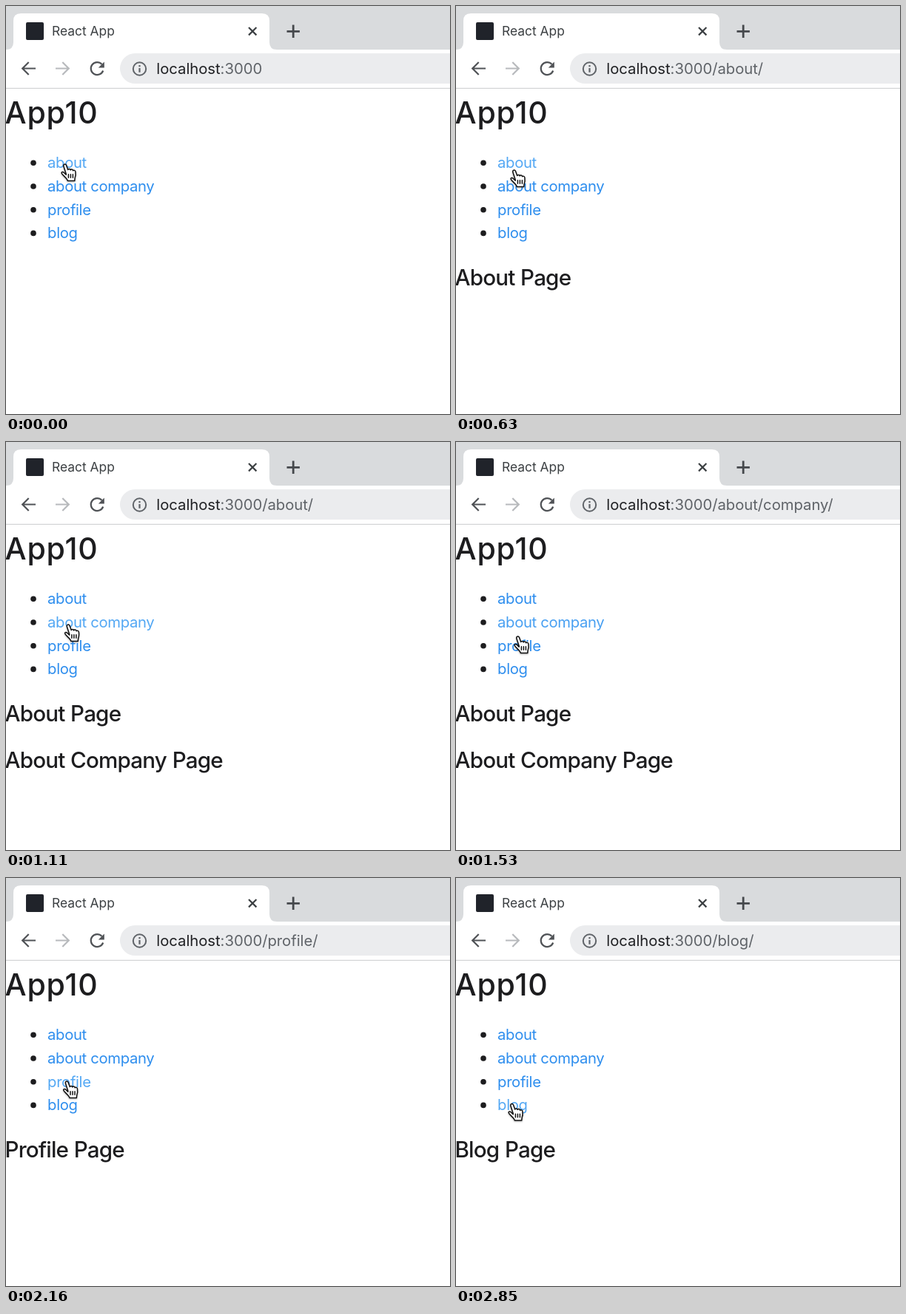
Recreate the animation shown at these times as an HTML page. Size 600 px wide and 552 px high, loop 3.06 s.

```html
<!DOCTYPE html>
<html lang="en">
<head>
<meta charset="utf-8">
<title>React App</title>
<style>
  html, body { margin: 0; height: 100%; overflow: hidden; background: #fff; }
  svg { display: block; width: 100vw; height: 100vh; }
  text { font-family: Inter, sans-serif; font-optical-sizing: none; fill: #1d1d1f; white-space: pre; }
  .title { font-size: 17.4px; fill: #3c4043; }
  .url { font-size: 20.3px; letter-spacing: -.04px; fill: #202124; }
  .path { fill: #5f6368; }
  .h1 { font-size: 41px; font-weight: 500; letter-spacing: .85px; }
  .h2 { font-size: 29.6px; font-weight: 500; letter-spacing: -.82px; word-spacing: .6px; }
  .link { font-size: 20.3px; letter-spacing: -.36px; }
  .line { fill: none; stroke: #505357; stroke-width: 2.2; }
</style>
</head>
<body>
<svg viewBox="0 0 600 552">
  <!-- tab strip -->
  <rect width="600" height="59" fill="#d9dbdd"/>
  <path d="M0 59Q10 59 10 49V20Q10 10 20 10H346Q356 10 356 20V49Q356 59 366 59Z" fill="#fff"/>
  <rect x="27" y="22" width="24" height="24" rx="2" fill="#20232a"/>
  <text class="title" x="62" y="40">React App</text>
  <path class="line" d="M328 29l10.4 10.4M338.400 29L328 39.400" style="stroke:#3c4043"/>
  <path class="line" d="M379.500 34.300h17.400M388.200 25.600v17.400" style="stroke:#45484c;stroke-width:2.800"/>

  <!-- toolbar -->
  <path class="line" d="M40 84.500H22.500M30.700 76L22.200 84.500L30.700 93"/>
  <path class="line" d="M67 84.500H84.500M76.300 76L84.800 84.500L76.300 93" style="stroke:#b8babd"/>
  <path class="line" d="M129.500 78.800A8.500 8.500 0 1 0 131.200 87.500"/>
  <path d="M132.800 75.500V83.500H124.800Z" fill="#505357"/>
  <rect x="154" y="64" width="500" height="41" rx="20.500" fill="#ebecee"/>
  <circle class="line" cx="180.500" cy="85" r="8.700" style="stroke:#5f6368;stroke-width:2"/>
  <path class="line" d="M180.500 80v2.200M180.500 84v5.800" style="stroke:#5f6368"/>
  <text class="url" x="203.300" y="92">localhost<tspan class="path" id="path"></tspan></text>
  <rect y="110.800" width="600" height="1.200" fill="#d2d3d5"/>

  <!-- page -->
  <text class="h1" x="-1.500" y="159">App10</text>
  <g id="list"></g>
  <text class="h2" id="first" x="-1.500" y="377.800"></text>
  <text class="h2" id="second" x="-1.500" y="441.200"></text>

  <g id="hand" stroke="#111" stroke-width="1.500" stroke-linejoin="round" stroke-linecap="round"
     style="filter:drop-shadow(0 1px 1px rgba(0,0,0,.3))">
    <path fill="#fff" d="M7.500 14.800L4.300 5C3.300 1.700 6.700 .5 7.800 3.300L10 9.300C10.500 7.600 13 7.700 13.400 9.600C14.200 8.200 16.500 8.600 16.800 10.400C17.800 9.300 20 10 20.200 12C20.600 15 20.800 17 19.400 20.500L19 24.300H9.700C9.200 21.300 4 17.700 2 14.800C.4 12.400 2.600 11.400 4.400 12.900L7.500 16Z"/>
    <path fill="none" d="M10.700 15.500v4.500M13.700 15.500v4.500M16.700 15.500v4.500"/>
  </g>
</svg>
<script>
const LOOP = 3060, STEP = 30, FADE = 300;
const BLUE = [46, 142, 238], HOVER = [84, 168, 244];
const $ = id => document.getElementById(id);

// label, hover start, hover end
const links = [
  ['about', -FADE, 690],
  ['about company', 720, 1440],
  ['profile', 1560, 2220],
  ['blog', 2250, LOOP],
];
// time, then value
const paths = [[0, ''], [390, '/about/'], [1140, '/about/company/'], [1950, '/profile/'], [2790, '/blog/']];
const pages = [
  [0, '', ''], [330, 'About Page', ''], [960, 'About Page', 'About Company Page'],
  [1920, 'Profile Page', ''], [2700, 'Blog Page', ''],
];
// time, x, y of the pointer
const moves = [
  [0, 73.7, 212.3], [30, 72.7, 220.3], [640, 72.7, 220.3], [840, 78.2, 245.3], [1335, 78.2, 245.3],
  [1530, 77.7, 261.3], [1860, 76.7, 271.3], [2145, 76.7, 271.3], [2370, 70.7, 301.3],
  [2520, 69.7, 303.8], [LOOP, 69.7, 303.8],
];

$('list').innerHTML = links.map(([label], i) => {
  const y = 219.2 + 31.7 * i;
  return `<circle cx="37" cy="${y - 6.9}" r="3.8" fill="#1d1d1f"/><text class="link" x="56.1" y="${y}">${label}</text>`;
}).join('');
const labels = document.querySelectorAll('.link');

const clamp = v => Math.max(0, Math.min(1, v));
const mix = (a, b, k) => a + (b - a) * k;
const current = (list, t) => list.filter(entry => entry[0] <= t).pop();

function draw(t) {
  $('path').textContent = ':3000' + current(paths, t)[1];
  [, $('first').textContent, $('second').textContent] = current(pages, t);

  links.forEach(([, start, end], i) => {
    const k = clamp((t - start) / FADE) - clamp((t - end) / FADE);
    labels[i].style.fill = `rgb(${BLUE.map((c, j) => Math.round(mix(c, HOVER[j], k)))})`;
  });

  const from = current(moves, t);
  const to = moves[moves.indexOf(from) + 1];
  const k = (t - from[0]) / (to[0] - from[0]);
  $('hand').setAttribute('transform', `translate(${mix(from[1], to[1], k)} ${mix(from[2], to[2], k)})`);
}

function tick() {
  const t = performance.now() % LOOP;
  draw(t - t % STEP);
  requestAnimationFrame(tick);
}
tick();
</script>
</body>
</html>
```
